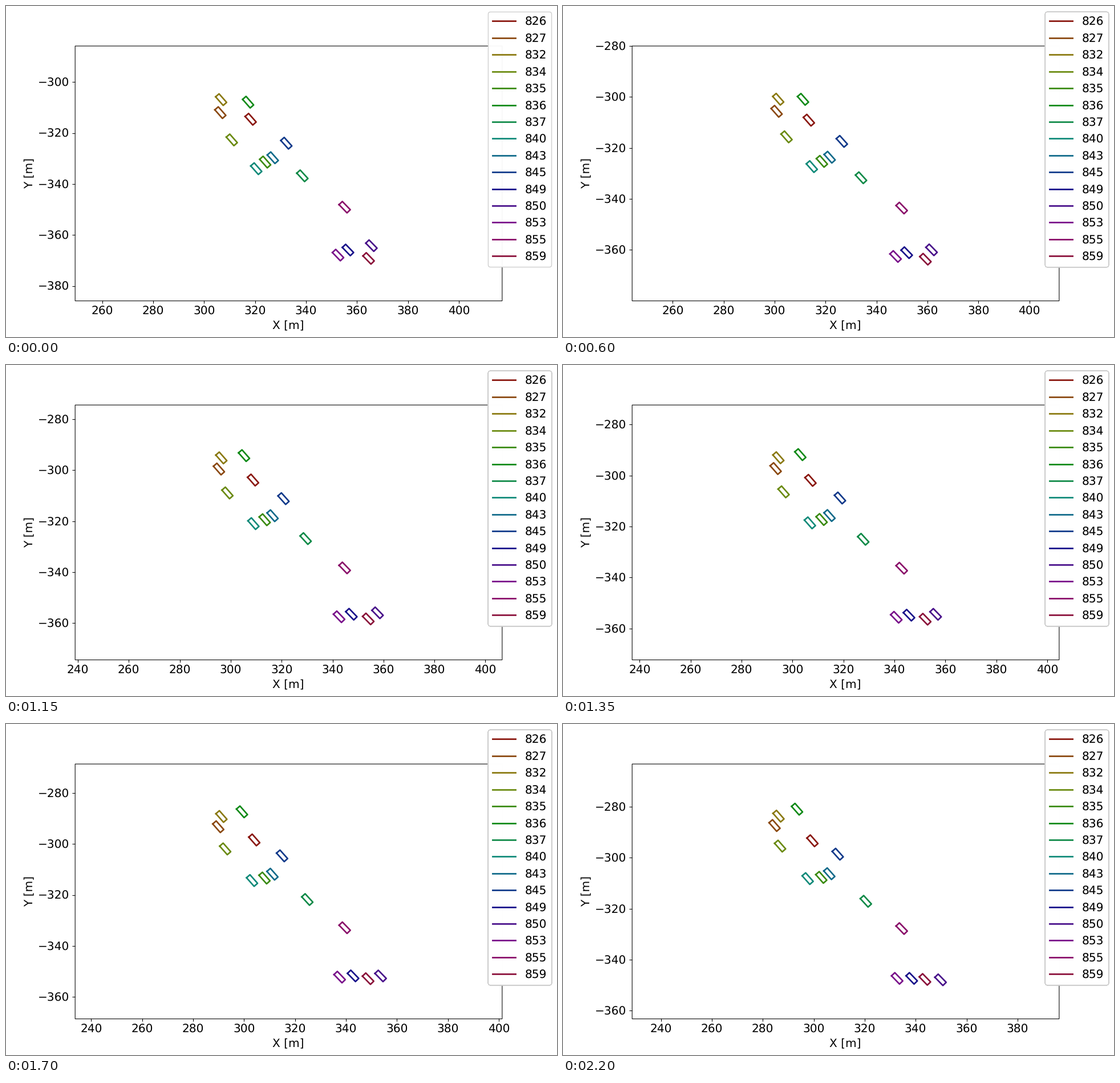
Recreate the animation shown at these times as a matplotlib script. Size 966 by 580 pixels, loop 2.25 s.

```python
import colorsys

import matplotlib.pyplot as plt
import numpy as np
from matplotlib.animation import FuncAnimation
from matplotlib.patches import FancyBboxPatch, Rectangle
from matplotlib.ticker import MultipleLocator

W, H, DPI = 966, 580, 96
FRAMES, INTERVAL = 45, 50
LENGTH, WIDTH = 4.5, 1.8          # vehicle size in metres
HALF_Y = 50                       # half of the visible height in metres
ZOOM = 29 / 30                    # legend rows sit on a slightly larger grid

# id: start x, start y, distance driven in one loop (metres)
CARS = {
    826: (318.3, -314.6, 28.4),
    827: (306.4, -312.0, 32.9),
    832: (306.7, -306.9, 31.0),
    834: (310.9, -322.7, 36.4),
    835: (324.0, -331.4, 31.7),
    836: (317.3, -307.9, 36.0),
    837: (338.6, -336.8, 26.8),
    840: (320.5, -334.0, 34.5),
    843: (327.0, -329.7, 31.4),
    845: (332.3, -324.0, 34.2),
    849: (356.5, -365.9, 25.9),
    850: (365.7, -364.2, 22.8),
    853: (352.6, -367.9, 28.6),
    855: (355.2, -349.1, 29.7),
    859: (364.6, -369.2, 30.0),
}
COLORS = [colorsys.hls_to_rgb(0.01 + i / len(CARS), 0.3, 0.8)
          for i in range(len(CARS))]

x0, y0, distance = np.array(list(CARS.values())).T
start = np.column_stack([x0, y0])
# The road bends slightly about halfway down.
heading = np.radians(132.85 + 1.45 * np.tanh((x0 - 341) / 12))
ahead = np.column_stack([np.cos(heading), np.sin(heading)])
side = np.column_stack([-ahead[:, 1], ahead[:, 0]])

plt.rcParams.update({"font.family": "DejaVu Sans", "font.size": 15.1,
                     "text.hinting": "none"})
fig, ax = plt.subplots(figsize=(W / DPI, H / DPI), dpi=DPI)
fig.subplots_adjust(left=0.125, right=0.9, bottom=0.11, top=0.88)
ax.set_xlabel("X [m]")
ax.set_ylabel("Y [m]")
ax.xaxis.set_major_locator(MultipleLocator(20))
ax.yaxis.set_major_locator(MultipleLocator(20))
ax.spines[:].set_visible(False)

pos = ax.get_position()
HALF_X = HALF_Y * (pos.width * W) / (pos.height * H)

outlines = [ax.plot([], [], color=c, lw=2)[0] for c in COLORS]

# Overlay in pixel coordinates for the plot border and the legend
top = fig.add_axes([0, 0, 1, 1], zorder=5)
top.set(xlim=(0, W), ylim=(H, 0))
top.axis("off")
top.add_patch(Rectangle((121.2, 70.1), pos.width * W, pos.height * H,
                        fill=False, lw=0.8, snap=False, zorder=-1))


def legend_box(z):
    box = FancyBboxPatch((845.3, 10.1), 110.7, 447.1,
                         boxstyle="round,pad=0,rounding_size=4",
                         fc="white", ec="0.8", alpha=0.8, lw=1,
                         snap=True, zorder=z)
    return top.add_patch(box)


def legend_entries():
    items = []
    for i, (name, color) in enumerate(zip(CARS, COLORS)):
        y = (round(27.46 + 30.417 * i) + 0.5) * ZOOM
        items += top.plot([853.4, 893.6], [y, y], color=color, lw=2,
                          snap=False)
        items.append(top.text(909.7, y + 7.1, str(name), va="baseline"))
    return items


# A translucent legend is added on every step, so its edge builds up.
boxes = [legend_box(k) for k in range(FRAMES + 1)]
entries = [legend_entries() for _ in range(2)]


def progress(n):
    """Share of the way covered, with a slight acceleration."""
    u = n / (FRAMES - 1)
    return u - 0.07 * u * (1 - u)


def update(n):
    centers = start + ahead * distance[:, None] * progress(n)
    cx, cy = centers.mean(axis=0)
    ax.set_xlim(cx - HALF_X, cx + HALF_X)
    ax.set_ylim(cy - HALF_Y, cy + HALF_Y)

    for line, center, a, b in zip(outlines, centers,
                                  ahead * LENGTH / 2, side * WIDTH / 2):
        corners = [a + b, a - b, -a - b, -a + b, a + b]
        line.set_data(*(center + corners).T)

    for k, box in enumerate(boxes):
        box.set_visible(k <= n + 1)
    for j, group in enumerate(entries):
        for item in group:
            item.set_zorder(n + 1.5 - j)
    return outlines


anim = FuncAnimation(fig, update, frames=FRAMES, interval=INTERVAL,
                     repeat=True, repeat_delay=0, blit=False)
plt.show()
```
